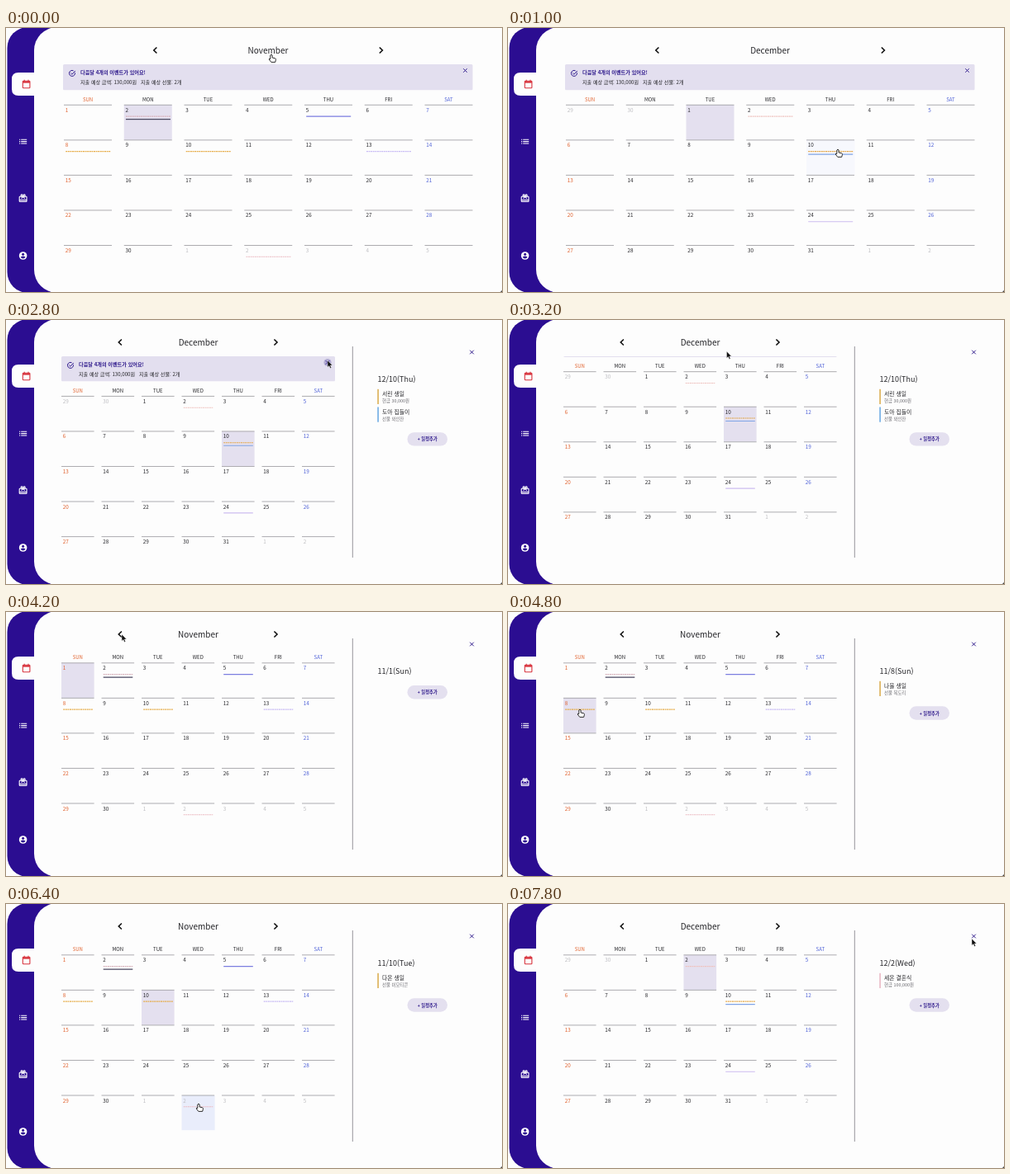
An HTML page for the animation above (8 s loop, 600x320 px).

```html
<!DOCTYPE html>
<html lang="ko">
<head>
<meta charset="utf-8">
<style>
html, body { margin: 0; width: 100%; height: 100%; overflow: hidden; background: #fff; }
svg { display: block; font-family: 'Noto Sans CJK KR', 'Noto Sans KR', 'Noto Sans CJK', 'Noto Sans', sans-serif; }
body > svg { width: 600px; height: 320px; }
</style>
</head>
<body>
<svg viewBox="0 0 600 320">
  <rect width="600" height="320" fill="#fdfdfd"/>
  <rect x="1.5" y="-1" width="90" height="322" rx="25" fill="#2b0d91"/>
  <rect x="34" y="-1" width="600" height="322" rx="28" fill="#fdfdfd"/>
  <path d="M600 317.5V320H597.5Q599.5 319.5 600 317.5z" fill="#333"/>
  <path d="M35 54H15Q7 54 7 62V74Q7 82 15 82H35z" fill="#fdfdfd"/>
  <g fill="none" stroke="#d8323c" stroke-width="1.1">
    <rect x="20.3" y="64.2" width="8.6" height="8.6" rx=".8"/>
    <path d="M20.3 65.6H28.9" stroke-width="2"/>
    <path d="M22.2 62.8V65M27 62.8V65"/>
  </g>
  <g fill="none" stroke="#fff" stroke-width="1.1">
    <path d="M16 135.2H17.2M18.2 135.2H25.2M16 137.6H17.2M18.2 137.6H25.2M16 140H17.2M18.2 140H25.2"/>
    <rect x="16.2" y="204.3" width="8.8" height="6.2" rx=".7"/>
    <path d="M16.2 208.6H25M18.6 206.8L20.6 204.2L22.6 206.8"/>
    <circle cx="19.1" cy="203" r="1.1"/>
    <circle cx="22.1" cy="203" r="1.1"/>
  </g>
  <circle cx="20.6" cy="276" r="4.8" fill="#fff"/>
  <circle cx="20.6" cy="274.2" r="1.5" fill="#2b0d91"/>
  <path d="M17.7 277.8Q18 276.5 20.6 276.4Q23.2 276.5 23.5 277.8Q22.5 279.4 20.6 279.4Q18.7 279.4 17.7 277.8z" fill="#2b0d91"/>
  <g id="view"></g>
  <g id="cursor"></g>
</svg>
<script>
const LOOP = 8000, STEP = 200;
const INK = '#242428', NAVY = '#2f1a8c', LILAC = '#e4e0ef';
const DAYS = ['SUN', 'MON', 'TUE', 'WED', 'THU', 'FRI', 'SAT'];
const GOLD = '#dfb868', BLUE = '#7fb5e6', ROSE = '#ecc0cb';

// first = weekday of the 1st, last = days in the month, prev = days in the month before
// lines: cell index -> colours; a leading ~ means dashed
const NOV = {
  name: 'November', first: 0, last: 30, prev: 31,
  lines: { 1: ['~#d9b4bd', '#4a4860'], 4: ['#7b7de0'], 7: ['~#e6ad4a'], 9: ['~#e6ad4a'], 12: ['~#c8bbf4'], 31: ['~#ecbcc3'] }
};
const DEC = {
  name: 'December', first: 2, last: 31, prev: 30,
  lines: { 3: ['~#efc3c0'], 11: ['~#e6a94a', '#7fa4e6'], 25: ['#cdbdf0'] }
};

const dec10 = { date: '12/10(Thu)', list: [['서린 생일', '현금 30,000원', GOLD], ['도아 집들이', '선물 와인잔', BLUE]] };
const nov1 = { date: '11/1(Sun)', list: [] };
const nov8 = { date: '11/8(Sun)', list: [['나율 생일', '선물 목도리', GOLD]] };
const nov10 = { date: '11/10(Tue)', list: [['다온 생일', '선물 이모티콘', GOLD]] };
const dec2 = { date: '12/2(Wed)', list: [['세온 결혼식', '현금 100,000원', ROSE]] };

const scenes = [
  { at: 0, month: NOV, sel: 1 },
  { at: 600, month: DEC, sel: 2 },
  { at: 1200, month: DEC, sel: 11, panel: dec10 },
  { at: 3800, month: NOV, sel: 0, panel: nov1 },
  { at: 4800, month: NOV, sel: 7, panel: nov8 },
  { at: 5800, month: NOV, sel: 9, panel: nov10 },
  { at: 6600, month: DEC, sel: 3, panel: dec2 }
];

// cell, pointer enters, pointer leaves
const hovers = [[11, 900, 1200], [13, 1100, 1900], [7, 4500, 4800], [11, 5000, 5300], [9, 5500, 5800], [31, 6100, 7300]];

// time, x, y of the pointer tip, kind from here on
const moves = [
  [0, 321, 32, 'hand'], [400, 453, 25, 'hand'], [800, 453, 25, 'hand'], [1000, 399, 147, 'hand'],
  [1800, 399, 147, 'hand'], [2600, 389, 49, 'arrow'], [3000, 389, 49, 'arrow'], [3400, 140, 27, 'arrow'],
  [4200, 140, 27, 'arrow'], [4600, 87, 118, 'hand'], [4800, 87, 118, 'hand'], [5200, 279, 124, 'hand'],
  [5400, 197, 152, 'hand'], [5600, 184, 126, 'hand'], [5800, 184, 126, 'hand'], [6200, 226, 225, 'hand'],
  [6400, 233, 242, 'hand'], [7400, 233, 242, 'hand'], [7800, 561, 42, 'arrow'], [8000, 561, 42, 'arrow']
];
const pointers = {
  hand: '<path d="M-1.2 1Q0 -.8 1.1 1V4L4.4 4.7Q5.7 5.1 5.4 6.5L4.7 9.4H-.2L-2.8 6Q-2.7 4.4 -1.2 5.6z" fill="#fff" stroke="#2c2c2c" stroke-width="1" stroke-linejoin="round"/>',
  arrow: '<path d="M0 0V8.2L1.9 6.5L3.2 9.4L4.6 8.8L3.3 6H5.8z" fill="#111" stroke="#fff" stroke-width=".4"/>'
};

const BANNER = 31.5;
const clamp = p => Math.max(0, Math.min(1, p));
const smooth = p => p * p * (3 - 2 * p);
const folded = t => BANNER * smooth(clamp((t - 2750) / 500));

const text = (x, y, size, str, fill = INK, extra = '') =>
  `<text x="${x}" y="${y}" font-size="${size}" fill="${fill}" ${extra}>${str}</text>`;
const rect = (x, y, w, h, fill, extra = '') =>
  `<rect x="${x}" y="${y}" width="${w}" height="${h}" fill="${fill}" ${extra}/>`;
const path = (d, stroke, width, extra = '') =>
  `<path d="${d}" fill="none" stroke="${stroke}" stroke-width="${width}" ${extra}/>`;
const cross = (x, y, r) => path(`M${x - r} ${y - r}l${2 * r} ${2 * r}m0 ${-2 * r}l${-2 * r} ${2 * r}`, NAVY, 1);
const mid = 'text-anchor="middle"', medium = 'font-weight="500"', bold = 'font-weight="700"';
const dayInk = col => col === 0 ? '#e0602c' : col === 6 ? '#4c5fd6' : INK;

const wide = { left: 69, x: 70, pitch: 72.75, w: 58, right: 564.5, title: 317, prev: 180.5, next: 453.7 };
const slim = { left: 67, x: 67, pitch: 48.5, w: 39.6, right: 398, title: 232.5, prev: 138, next: 326.3 };

function bannerBox(g, t, h) {
  const cx = g.left + 11, x = g.left + 21, end = g.right - 9;
  const halo = t >= 2600 ? `<circle cx="${end}" cy="51.5" r="4.6" fill="#8d86bd" opacity=".55"/>` : '';
  return `<svg y="44" width="600" height="${h}" viewBox="0 44 600 ${h}">` +
    rect(g.left, 44, g.right - g.left, h, '#e3dfef', 'rx="1.5"') +
    path(`M${cx + 3.4} 54.2A3.5 3.5 0 1 1 ${cx + 1.6} 51.8M${cx - 1.8} 54.6l1.6 1.6l4-4.2`, NAVY, 1) +
    text(x, 56, 6.15, '다음달 4개의 이벤트가 있어요!', NAVY, bold) +
    text(x, 67.6, 6.1, '지출 예상 금액: 130,000원') +
    text(x + 73, 67.6, 6.1, '지출 예상 선물: 2개') + halo + cross(end, 51.5, 2.2) + '</svg>';
}

function calendar(s, g, t, dy) {
  const m = s.month;
  let out = '';
  DAYS.forEach((d, i) => {
    out += text(g.x + i * g.pitch + g.w / 2, 88.6 + dy, 6, d, dayInk(i), mid);
  });
  for (let i = 0; i < 35; i++) {
    const col = i % 7, x = g.x + col * g.pitch, y = 93.3 + dy + (i / 7 | 0) * 42.55;
    const n = i - m.first + 1, inside = n > 0 && n <= m.last;
    if (i === s.sel) out += rect(x, y, g.w, 42.2, LILAC);
    else for (const [cell, from, to] of hovers) {
      const a = Math.min(1, (t - from) / 300, (to + 400 - t) / 400);
      if (cell === i && a > 0) out += rect(x, y, g.w + .5, 42.2, '#e9edfb', `opacity="${a}"`);
    }
    out += path(`M${x} ${y}h${g.w}`, '#98979c', .8);
    out += text(x + 1.8, y + 8.5, 6.3, n < 1 ? m.prev + n : inside ? n : n - m.last, inside ? dayInk(col) : '#bdbdc1');
    (m.lines[i] || []).forEach((c, k) => {
      const dash = c[0] === '~';
      out += path(`M${x + 2.2} ${y + 13.8 + k * 3.5}h${g.w - 4}`, dash ? c.slice(1) : c, 1.1, dash ? 'stroke-dasharray="2 .6"' : '');
    });
  }
  return out;
}

function sidePanel(p) {
  let out = path('M419.3 32V288', '#8b8a90', .9) + cross(563.5, 39, 2.3) + text(449.5, 74.8, 9, p.date, INK, medium);
  p.list.forEach(([title, note, color], i) => {
    const y = 83.8 + i * 21.7;
    out += rect(449.2, y, 1.8, 18.2, color) + text(455, y + 8, 6.8, title, INK, medium) + text(455, y + 16.5, 5.4, note, '#6c6b71');
  });
  const by = [97.2, 122.5, 144.4][p.list.length];
  return out + rect(485.5, by - 8.2, 48.5, 16.4, LILAC, 'rx="8.2"') +
    text(509.8, by + 2, 5.3, '+ 일정추가', NAVY, mid + ' ' + bold);
}

function draw(t) {
  const s = scenes.filter(c => c.at <= t).pop(), g = s.panel ? slim : wide;
  const fold = folded(t), h = BANNER - fold;
  view.innerHTML =
    text(g.title, 30.6, 10, s.month.name, INK, mid) +
    path(`M${g.prev + 1.9} 23.5l-3.6 3.5l3.6 3.5M${g.next - 1.9} 23.5l3.6 3.5l-3.6 3.5`, '#111', 1.6) +
    (h > 0 ? bannerBox(g, t, h) : '') + calendar(s, g, t, -fold) + (s.panel ? sidePanel(s.panel) : '');

  const i = moves.findIndex(k => k[0] > t), a = moves[i - 1], b = moves[i];
  const p = (t - a[0]) / (b[0] - a[0]);
  const at = k => a[k] + (b[k] - a[k]) * p;
  cursor.setAttribute('transform', `translate(${at(1)} ${at(2)})`);
  cursor.innerHTML = pointers[a[3]];
}

const view = document.getElementById('view'), cursor = document.getElementById('cursor');
const start = performance.now();
let shown = -1;
function tick() {
  const t = Math.floor((performance.now() - start) % LOOP / STEP) * STEP;
  if (t !== shown) draw(shown = t);
  requestAnimationFrame(tick);
}
tick();
</script>
</body>
</html>
```
